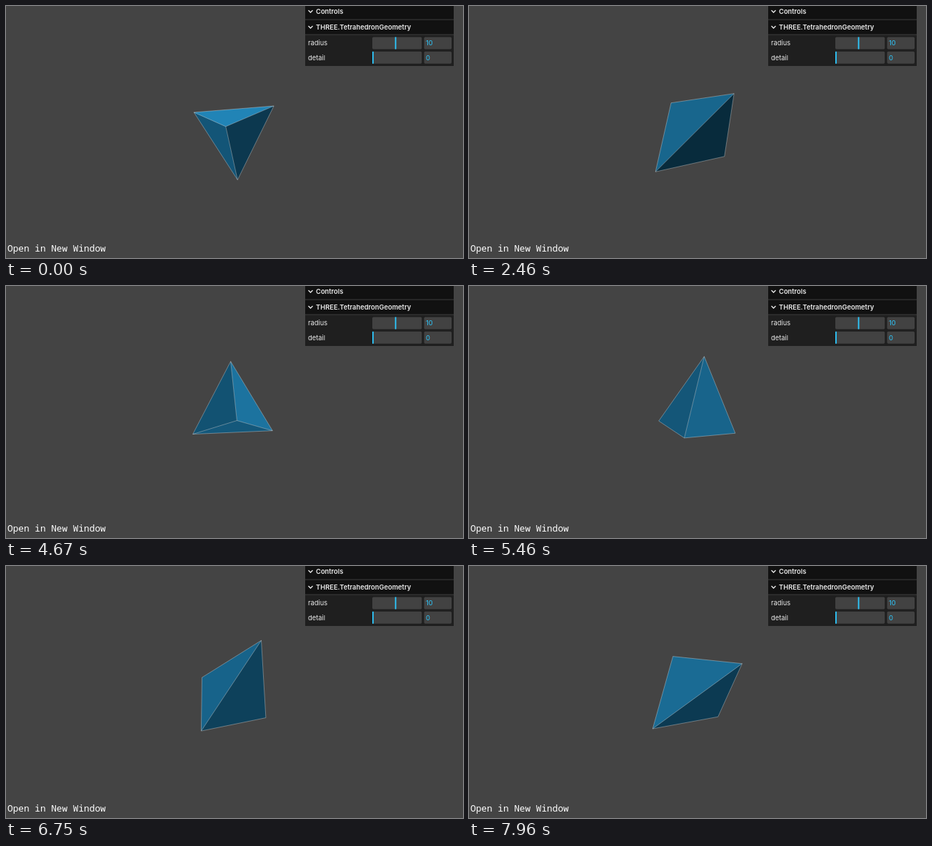
Recreate the animation shown at these times as an HTML page. Size 640x353 px, loop 8 s.

```html
<!DOCTYPE html>
<html lang="en">
<head>
<meta charset="utf-8">
<title>Tetrahedron</title>
<style>
  html, body { margin: 0; width: 100%; height: 100%; overflow: hidden; background: #444; }
  svg { display: block; width: 640px; height: 353px; }
  .gui { font: 9.35px Inter, sans-serif; fill: #ebebeb; }
  .title { font-weight: 600; }
  .value, .mark { fill: #2cc9ff; }
  .widget { fill: #424242; }
  .chevron { fill: none; stroke: #ebebeb; stroke-width: 1.3; }
  .link { font: 12.75px "Noto Sans Mono", "DejaVu Sans Mono", monospace; fill: #fff; }
  #edges { fill: none; stroke: #fff; stroke-opacity: .45; stroke-width: .7; }
</style>
</head>
<body>
<svg viewBox="0 0 640 353">
  <rect width="640" height="353" fill="#444"/>
  <g id="faces"></g>
  <path id="edges"/>

  <g class="gui">
    <rect x="419" width="208" height="84" fill="#1f1f1f"/>
    <rect x="419" width="208" height="40" fill="#111"/>
    <rect class="widget" x="419" y="18.6" width="208" height=".9"/>
    <rect class="widget" x="419" y="39.6" width="208" height=".9"/>
    <path class="chevron" d="M423.5 6l3 3 3-3M423.5 28l3 3 3-3"/>
    <text class="title" x="434" y="11.3">Controls</text>
    <text class="title" x="434" y="33.3">THREE.TetrahedronGeometry</text>
    <g id="rows"></g>
  </g>

  <text class="link" x="2" y="344">Open in New Window</text>
</svg>
<script>
const LOOP = 8000, STEP = 1000 / 24;
const START_ANGLE = 2.465, SPEED = 0.301;          // radians, radians per second
const CENTER = [318, 175.6], UNIT = 44.6;          // pixels per model unit at the origin
const DEPTH = 30 * Math.sqrt(3) / 10;              // camera distance in model units
const VERTICES = [[1, 1, 1], [-1, -1, 1], [-1, 1, -1], [1, -1, -1]];
const LIGHTS = [[0, 1, 0], [1, 2, 1], [-1, -2, -1]].map(v => v.map(n => n / Math.hypot(...v)));

const $ = id => document.getElementById(id);
const toLinear = n => ((n / 255 + .055) / 1.055) ** 2.4;
const toSRGB = n => Math.round(255 * (1.055 * n ** (1 / 2.4) - .055));
const dot = (a, b) => a.reduce((sum, n, i) => sum + n * b[i], 0);

const DIFFUSE = [0x15, 0x62, 0x89].map(toLinear);
const EMISSIVE = [0x07, 0x25, 0x34].map(toLinear);

$('rows').innerHTML = [['radius', 10, 52, 544.7], ['detail', 0, 72.3, 513]].map(([name, value, y, mark]) => `
  <text x="423" y="${y + 3.2}">${name}</text>
  <rect class="widget" x="513" y="${y - 8.5}" width="69.3" height="17" rx="1.7"/>
  <rect class="mark" x="${mark}" y="${y - 8.5}" width="1.8" height="17"/>
  <rect class="widget" x="585.5" y="${y - 8.5}" width="38.5" height="17" rx="1.7"/>
  <text class="value" x="588" y="${y + 3.2}">${value}</text>`).join('');

const faces = VERTICES.map(() =>
  $('faces').appendChild(document.createElementNS('http://www.w3.org/2000/svg', 'polygon')));

// Equal turns about y, then x.
function rotate([x, y, z], angle) {
  const c = Math.cos(angle), s = Math.sin(angle);
  const depth = c * z - s * x;
  return [c * x + s * z, c * y - s * depth, s * y + c * depth];
}

function project([x, y, z]) {
  const scale = UNIT * DEPTH / (DEPTH - z);
  return [CENTER[0] + x * scale, CENTER[1] - y * scale].map(n => n.toFixed(2)).join(' ');
}

function shade(normal) {
  const light = 3 / Math.PI * LIGHTS.reduce((sum, l) => sum + Math.max(0, dot(normal, l)), 0);
  return `rgb(${DIFFUSE.map((n, i) => toSRGB(EMISSIVE[i] + n * light))})`;
}

function draw(ms) {
  const seconds = Math.floor((ms + 5) / STEP) * STEP / 1000;
  const points = VERTICES.map(v => rotate(v, START_ANGLE + SPEED * seconds));
  const screen = points.map(project);

  // Each face lies opposite one vertex, so its normal points away from it.
  const visible = points.map((p, i) => {
    const normal = p.map(n => -n / Math.sqrt(3));
    const shown = normal[2] > 1 / 9;
    faces[i].style.display = shown ? '' : 'none';
    faces[i].setAttribute('points', screen.filter((_, j) => j !== i).join(' '));
    faces[i].setAttribute('fill', shade(normal));
    return shown;
  });

  let path = '';
  for (let a = 0; a < 4; a++) {
    for (let b = a + 1; b < 4; b++) {
      if (visible.some((shown, i) => shown && i !== a && i !== b)) {
        path += `M${screen[a]}L${screen[b]}`;
      }
    }
  }
  $('edges').setAttribute('d', path);
}

const start = performance.now();
function tick() {
  draw((performance.now() - start) % LOOP);
  requestAnimationFrame(tick);
}
tick();
</script>
</body>
</html>
```
